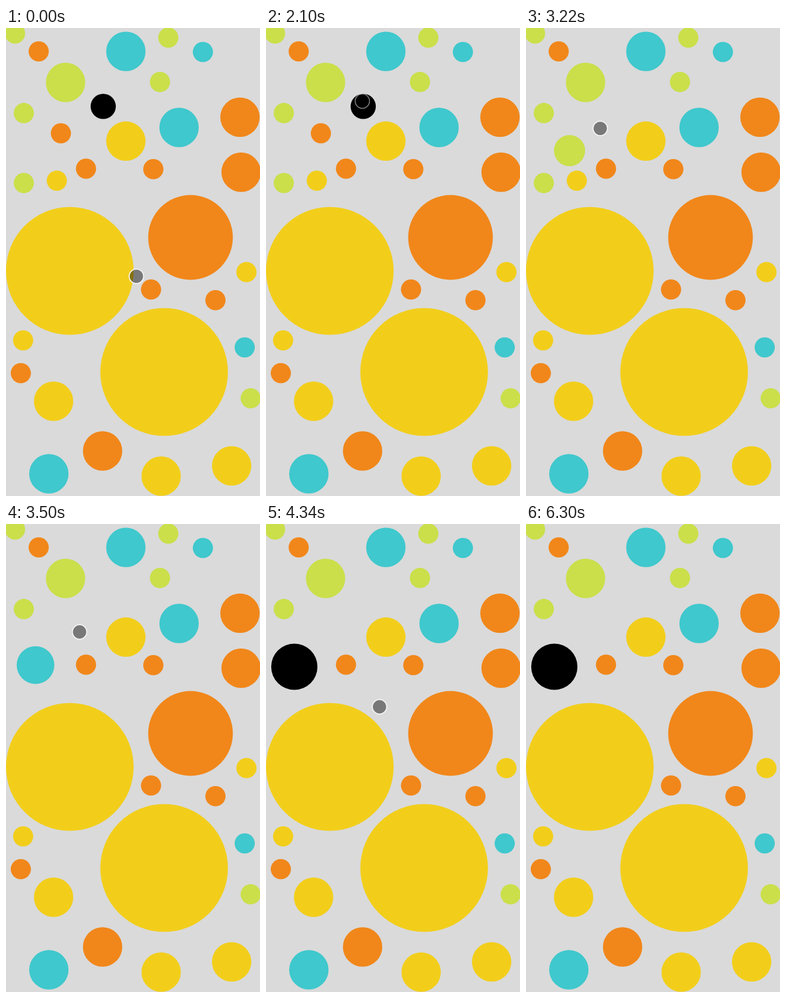
Recreate the animation shown at these times as an HTML page with a canvas. Size 435 by 800 pixels, loop 6.37 s.

```html
<!DOCTYPE html>
<html lang="en">
<head>
<meta charset="utf-8">
<title>Circles</title>
<style>
html, body { margin: 0; width: 100%; height: 100%; overflow: hidden; background: #dadada; }
canvas { display: block; }
</style>
</head>
<body>
<canvas id="stage" width="435" height="800"></canvas>
<script>
const ctx = document.getElementById('stage').getContext('2d');
const LOOP = 6370, STEP = 70, GROW_TIME = 400, FADE_TIME = 210;
const YELLOW = '#f2ce1b', ORANGE = '#f1871a', CYAN = '#3fc8cd', GREEN = '#cbdf4a';
const SMALL = 17.3, MEDIUM = 33.7, LARGE = 72.5, HUGE = 109.3;

const clamp = v => Math.min(1, Math.max(0, v));
const mix = (a, b, p) => a + (b - a) * p;
const progress = (t, start, duration) => clamp((t - start) / duration);

function disc(x, y, r, color) {
  ctx.beginPath();
  ctx.arc(x, y, r, 0, 2 * Math.PI);
  ctx.fillStyle = color;
  ctx.fill();
}

function discs(r, color, ...centres) {
  for (const [x, y] of centres) disc(x, y, r, color);
}

function drawField() {
  discs(HUGE, YELLOW, [109.3, 415.3], [270.8, 588]);
  discs(LARGE, ORANGE, [316, 358]);
  discs(MEDIUM, YELLOW, [205.3, 193.3], [81.5, 638], [265.7, 766], [386.4, 748.5]);
  discs(MEDIUM, ORANGE, [400.7, 152.5], [402.6, 246.5], [165.4, 723]);
  discs(MEDIUM, CYAN, [205.3, 40], [296.4, 170], [73.4, 762]);
  discs(MEDIUM, GREEN, [102, 93]);
  discs(SMALL, YELLOW, [411.8, 417.3], [29.3, 534]);
  discs(SMALL, ORANGE, [56, 40], [137, 240.5], [252.3, 241.3], [248.4, 447], [358.7, 465.3], [25.4, 590]);
  discs(SMALL, CYAN, [337.2, 41], [408.8, 546]);
  discs(SMALL, GREEN, [15.5, 9.5], [278, 16.5], [263.7, 92.3], [30.5, 145.4], [419, 633]);
}

// The player takes on the flash colour while it grows after each meal.
const meals = [
  { x: 94, y: 180, color: ORANGE, eaten: 2880, flash: GREEN },
  { x: 87, y: 261, color: YELLOW, eaten: 3290, flash: CYAN },
  { x: 30.5, y: 265, color: GREEN, eaten: 3400, flash: CYAN }
];

function drawPlayer(t) {
  let r = 21.6, color = '#000';
  for (const meal of meals) {
    const growth = progress(t, meal.eaten, GROW_TIME);
    if (growth === 0) disc(meal.x, meal.y, SMALL, meal.color);
    else if (growth < 1) color = meal.flash;
    r += 6 * growth;
  }
  const p = 1 - (1 - progress(t, 2660, 910)) ** 1.58;
  disc(mix(166.5, 48.5, p), mix(134, 244, p ** 1.5), r, color);
}

function drawTouch(x, y, opacity) {
  ctx.globalAlpha = opacity;
  disc(x, y, 12.3, 'rgba(0,0,0,.45)');
  ctx.strokeStyle = '#f4f4f4';
  ctx.lineWidth = 1.8;
  ctx.stroke();
  ctx.globalAlpha = 1;
}

const swipe = [
  { t: 2590, x: 165, y: 125 },
  { t: 2940, x: 128.3, y: 158.7 },
  { t: 3500, x: 126, y: 184.5 },
  { t: 4340, x: 194.4, y: 312.5 }
];

function drawSwipe(t) {
  let { x, y } = swipe[0];
  for (let i = 1; i < swipe.length; i++) {
    const from = swipe[i - 1], to = swipe[i];
    const p = progress(t, from.t, to.t - from.t);
    x += (to.x - from.x) * p;
    y += (to.y - from.y) * p;
  }
  drawTouch(x, y, progress(t, 2000, FADE_TIME) * (1 - progress(t, 4390, FADE_TIME)));
}

function draw(t) {
  ctx.fillStyle = '#dadada';
  ctx.fillRect(0, 0, 435, 800);
  drawField();
  drawPlayer(t);
  drawTouch(223.3, 424.4, 1 - progress(t, 0, FADE_TIME));
  drawSwipe(t);
}

function frame() {
  const t = performance.now() % LOOP;
  draw(Math.floor(t / STEP) * STEP);
  requestAnimationFrame(frame);
}
frame();
</script>
</body>
</html>
```
